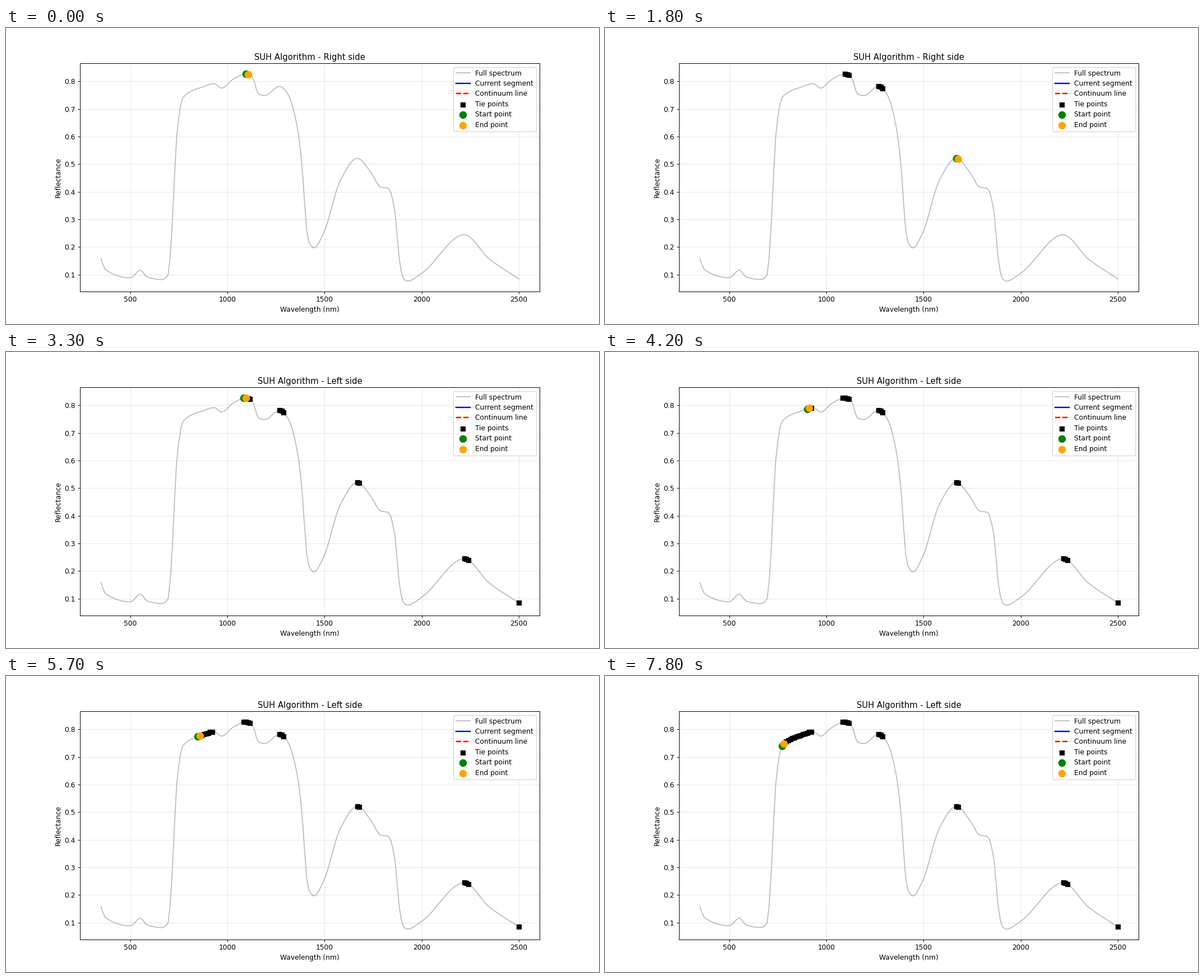
Animation, 1058 px wide and 529 px high, one loop 8 s. Source, as a matplotlib script:

```python
import matplotlib.pyplot as plt
import numpy as np
from matplotlib.animation import FuncAnimation

plt.rcParams["font.family"] = "DejaVu Sans"

N = 200
TICK = 100
TICKS_PER_STEP = 3
TOTAL = 80

# Peaks, valleys and edges of the spectrum: (sample index, reflectance)
KEYS = np.array([
    (0, .158), (2, .119), (14, .0888), (18.7, .1165), (22, .0915),
    (29, .0822), (32, .1), (34, .292), (36, .596), (39, .741),
    (48, .779), (54, .792), (57.4, .7755), (63, .8085), (69, .8273),
    (72, .818), (75, .7544), (78, .7487), (85, .7824), (89, .7544),
    (94, .6115), (96, .4685), (98, .2587), (99, .2196), (101.4, .1965),
    (106, .2506), (114, .4412), (122, .5215), (129, .4655), (133, .418),
    (137, .412), (140, .3287), (142, .1604), (144, .0854), (146, .0767),
    (153, .1067), (173, .2447), (185, .1564), (199, .085),
])


def monotone_curve(keys, at):
    """Piecewise cubic through the key points, without overshoot."""
    x, y = keys.T
    h = np.diff(x)
    d = np.diff(y) / h
    m = np.concatenate(([d[0]], np.zeros(len(d) - 1), [d[-1]]))
    for i in range(1, len(d)):
        if d[i - 1] * d[i] > 0:
            a, b = 2 * h[i] + h[i - 1], h[i] + 2 * h[i - 1]
            m[i] = (a + b) / (a / d[i - 1] + b / d[i])
    i = np.clip(np.searchsorted(x, at, side="right") - 1, 0, len(h) - 1)
    t = (at - x[i]) / h[i]
    return (y[i] * (1 + 2 * t) * (1 - t) ** 2
            + y[i + 1] * t ** 2 * (3 - 2 * t)
            + h[i] * t * (1 - t) * (m[i] * (1 - t) - m[i + 1] * t))


wave = np.linspace(350, 2500, N)
refl = monotone_curve(KEYS, np.arange(N))
points = np.column_stack((wave, refl))

# Tie points: the hull follows each peak, then jumps over the valley
right = [*range(69, 72), *range(85, 88), *range(122, 124),
         *range(173, 176), N - 1]
left = [69, 68, *range(53, 38, -1)]


def walk(side, path, known=()):
    """Steps along a path: (side, lower index, upper index, tie points)."""
    return [(side, *sorted(path[i:i + 2]), [*known, *path[:i + 1]])
            for i in range(len(path) - 1)]


steps = walk("Right", right) + walk("Left", left, right)

fig, ax = plt.subplots(figsize=(12, 6), dpi=1058 / 12)
ax.plot(wave, refl, color="gray", alpha=0.5, label="Full spectrum")
segment, = ax.plot([], [], "b-", lw=2, label="Current segment")
chord, = ax.plot([], [], "r--", lw=2, label="Continuum line")


def dots(color, size, marker, label):
    return ax.scatter([], [], c=color, s=size, marker=marker, zorder=5,
                      label=label)


ties = dots("black", 50, "s", "Tie points")
start_dot = dots("green", 100, "o", "Start point")
end_dot = dots("orange", 100, "o", "End point")

ax.set_xlabel("Wavelength (nm)")
ax.set_ylabel("Reflectance")
ax.set_xlim(242.5, 2607.5)
ax.set_ylim(0.0392, 0.8649)
ax.grid(True, alpha=0.3)
ax.legend(loc="upper right", labelspacing=0.445)
title = ax.set_title("", pad=5)


def update(tick):
    side, a, b, found = steps[min(tick // TICKS_PER_STEP, len(steps) - 1)]
    title.set_text(f"SUH Algorithm - {side} side")
    segment.set_data(wave[a:b + 1], refl[a:b + 1])
    chord.set_data(wave[[a, b]], refl[[a, b]])
    ties.set_offsets(points[found])
    start_dot.set_offsets(points[[a]])
    end_dot.set_offsets(points[[b]])
    return title, segment, chord, ties, start_dot, end_dot


anim = FuncAnimation(fig, update, frames=TOTAL, interval=TICK,
                     repeat=True, repeat_delay=0, blit=False)
plt.show()
```
